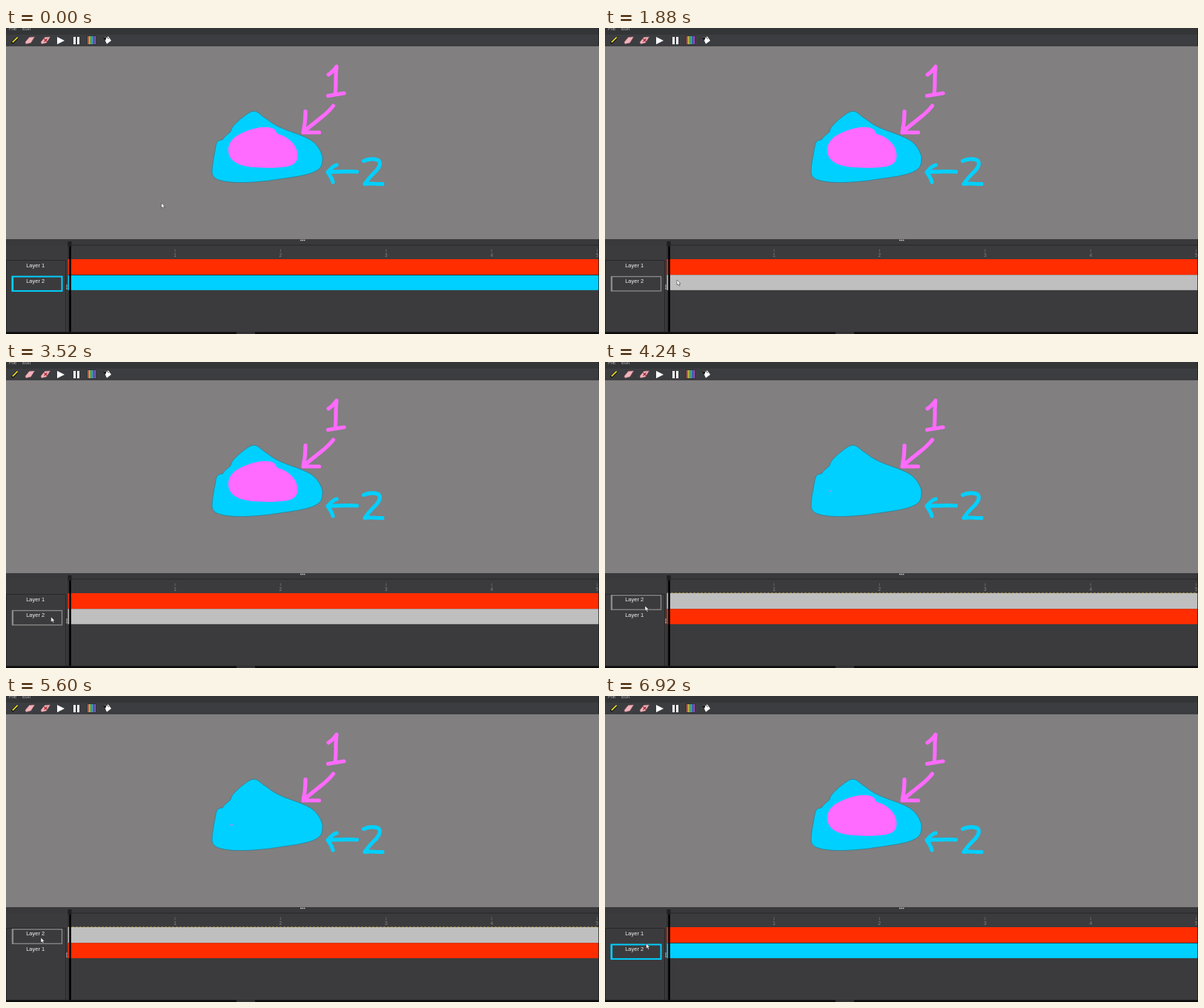
An HTML page for the animation above (6960 ms loop, 800 by 413 pixels).

```html
<!DOCTYPE html>
<html lang="en">
<head>
<meta charset="utf-8">
<title>Layer reordering</title>
<style>
  html, body { margin: 0; width: 100%; height: 100%; overflow: hidden; background: #3b3b3d; }
  svg { display: block; width: 100vw; height: 100vh; }
  text { font-family: "Liberation Sans", Arial, sans-serif; }
  .brush { fill: none; stroke-width: 5.2; stroke-linecap: round; stroke-linejoin: round; }
</style>
</head>
<body>
<svg viewBox="0 0 800 413" preserveAspectRatio="none">
  <rect width="800" height="413" fill="#3b3b3d"/>

  <g id="toolbar">
    <rect width="800" height="9" fill="#343537"/>
    <rect y="9" width="800" height="15" fill="#3c3d40"/>
    <g font-size="6.5" fill="#b4b4b4">
      <text x="4" y="2.6">File</text>
      <text x="22" y="2.6">Edit</text>
    </g>
    <path d="M8 20.5L15.5 13" stroke="#111" stroke-width="3.4"/>
    <path d="M8.8 19.4L15.6 12.6" stroke="#e8dc30" stroke-width="1.8"/>
    <path id="eraser" d="M26 19L31.5 12.5L38.5 12L33.5 20L27 21.5Z" fill="#f3b3bb" stroke="#a66c74" stroke-width=".5"/>
    <use href="#eraser" x="21"/>
    <path d="M51.5 14.5l4 4m0-4l-4 4" stroke="#a02030" stroke-width="1.1"/>
    <path d="M69 12L79 17L69 22Z" fill="#fff"/>
    <path d="M91 12h3v10h-3zM96 12h3v10h-3z" fill="#fff"/>
    <g id="palette"></g>
    <path d="M132 13L138 11.5L142 17L136 21.5Z" fill="#fff"/>
    <path d="M131 13.5L136 12L134 17Z" fill="#151515"/>
    <path d="M136 11.5l2.5 3.5" stroke="#222" stroke-width=".8"/>
  </g>

  <rect y="24" width="800" height="261" fill="#817f80"/>
  <path d="M0 24H800" stroke="#2c2c2e"/>

  <g id="drawing">
    <path fill="#00d0ff" stroke="#32778a" stroke-width=".7" d="M278 194C278 184 281 172 283 160C284 153 287 151 292 151
      C295 146 300 143 303 140C304 133 311 128 316 123C322 119 328 113 333 112.5C340 111 344 119 352 123
      C368 137 389 140 407 149C418 154 425 165 427 174C427 186 425 189 418 193C405 200 380 202 355 206
      C335 208 306 211 287 205C281 203 278 199 278 194Z"/>
    <path id="pinkBlob" fill="#ff6aff" d="M300 167C299 152 311 144 325 139C337 134 353 132 361 136C365 138 364 142 367 143
      C378 146 391 155 393 168C395 179 390 185 379 187C364 190 333 189 321 186C309 183 301 177 300 167Z"/>
    <path id="speck" d="M302 174.5l4-.8" stroke="#9a90f0" stroke-width="1.4"/>
    <g class="brush" stroke="#ff6aff">
      <path d="M435 63C440 60 443 56 446 52C444 64 446 76 444 89M434.5 91.5L456 88"/>
      <path d="M441.5 105C434 115 426 120 420 125C414 130 407 135 401 141M404 112.5C404 122 403 132 401 141L422.5 141"/>
    </g>
    <g class="brush" stroke="#00d0ff">
      <path d="M482.5 179.5C489 176 499 176 503 179C507 184 501 192 495 197C490 202 487 206 484 210.5C492 209 500 211 508 210.5"/>
      <path d="M473.5 194C460 193 447 194 434 194.5M446 185C441 186 437 191 434 194.5C437 199 440 203 441 208"/>
    </g>
  </g>

  <g id="panel">
    <rect y="285" width="800" height="7.5" fill="#39393b"/>
    <path d="M84 293H800" stroke="#262628"/>
    <path d="M0 313.5H80.5V410M0.5 313V410" fill="none" stroke="#272729"/>
    <path d="M84 288V410" stroke="#2d2d2f"/>
    <path d="M397 286.5h1.6m.8 0h1.6m.8 0h1.6" stroke="#d5d5d5" stroke-width="1.4"/>
    <g id="ruler" font-size="6.5" fill="#858587" text-anchor="middle"></g>
    <rect id="topLane" x="83.5" y="312" width="716.5" height="21.3"/>
    <rect id="bottomLane" x="83.5" y="333.3" width="716.5" height="20.5"/>
    <path id="laneDivider" d="M84 333.4H800" stroke="#242426" stroke-width=".8"/>
    <path id="dropLine" d="M84 312H800" stroke="#c9b96a" stroke-width="1" stroke-dasharray="3 2"/>
    <path d="M86.5 288V410" stroke="#000" stroke-width="2.6"/>
    <rect x="83.5" y="288" width="5" height="7" fill="#1f1f21"/>
    <path d="M82 346.5v1.3m0 1v1.3m0 1v1.3" stroke="#ddd" stroke-width="1.3"/>
    <g id="selection" fill="none">
      <rect x="8.5" y="314.8" width="67" height="19.4"/>
      <path d="M9 314.5V334.5" stroke-width="2.2"/>
    </g>
    <g font-size="7.5" fill="#f0f0f0" text-anchor="middle">
      <text id="topLabel" x="39.7" y="323.4"></text>
      <text id="bottomLabel" x="39.7" y="344.4"></text>
    </g>
    <rect y="410.3" width="800" height="2.7" fill="#0c0c0d"/>
    <rect x="311" y="410.3" width="25" height="2.7" fill="#343436"/>
    <path d="M799.6 0V24M799.6 285V413" stroke="#19191a" stroke-width=".8"/>
  </g>

  <path id="cursor" d="M0 0V7L1.7 5.5L2.9 8.2L4.1 7.7L2.9 5.1H5Z" fill="#fff" stroke="#222" stroke-width=".5"/>
</svg>

<script>
const LOOP = 6960;
const GRAB = 600, RELEASE = 6280;
const LANE_EDGE = 333;
const RED = '#ff2d00', CYAN = '#00d0ff', GREY = '#c0bfc0';

// Pointer tip: time, x, y
const pointerPath = [
  [0, 209.5, 236], [80, 208, 238], [460, 99, 341], [640, 98, 341],
  [920, 97, 322], [1180, 97, 321], [1640, 97, 342], [1880, 97, 340],
  [2120, 96, 343], [2680, 93, 328], [2860, 92, 325], [3300, 72, 346],
  [3560, 60, 344], [4080, 54, 328], [4240, 54, 329], [4760, 51, 343],
  [5020, 49, 342], [5500, 47, 325], [5600, 47, 326], [6200, 53, 341],
  [6400, 55, 338], [6760, 55.5, 334], [LOOP, 55.5, 334]
];

const $ = id => document.getElementById(id);
const set = (id, attrs) => {
  for (const name in attrs) $(id).setAttribute(name, attrs[name]);
};
const show = (id, visible) => set(id, { visibility: visible ? 'visible' : 'hidden' });

function buildStatics() {
  const hues = ['#d35a5a', '#e0cf45', '#50c45d', '#42bdcf', '#4965dc', '#a954c9'];
  $('palette').innerHTML = '<rect x="109.5" y="10.5" width="12" height="12" fill="#202428"/>' +
    hues.map((c, i) => `<rect x="${110 + i * 1.9}" y="11" width="1.6" height="11" fill="${c}"/>`).join('');
  $('ruler').innerHTML = [1, 2, 3, 4, 5].map(n => {
    const x = 85.6 + n * 142.4;
    return `<path d="M${x} 298.5v4" stroke="#67676a"/><text x="${x}" y="308.8">${n}</text>`;
  }).join('');
}

function pointerAt(t) {
  const next = Math.max(1, pointerPath.findIndex(p => p[0] > t));
  const [t0, x0, y0] = pointerPath[next - 1];
  const [t1, x1, y1] = pointerPath[next];
  const u = (t - t0) / (t1 - t0);
  const eased = u * u * (3 - 2 * u);
  return [x0 + (x1 - x0) * eased, y0 + (y1 - y0) * eased];
}

function render(t) {
  const [x, y] = pointerAt(t);
  const dragging = t >= GRAB && t < RELEASE;
  const swapped = dragging && y < LANE_EDGE;
  const active = dragging ? GREY : CYAN;

  set('cursor', { transform: `translate(${x.toFixed(2)} ${y.toFixed(2)})` });
  set('topLane', { fill: swapped ? active : RED });
  set('bottomLane', { fill: swapped ? RED : active });
  set('selection', {
    transform: `translate(0 ${swapped ? 0 : 20.7})`,
    stroke: dragging ? '#8b8b8c' : CYAN,
    'stroke-width': dragging ? 1.3 : 2
  });
  $('topLabel').textContent = swapped ? 'Layer 2' : 'Layer 1';
  $('bottomLabel').textContent = swapped ? 'Layer 1' : 'Layer 2';
  show('pinkBlob', !swapped);
  show('speck', swapped);
  show('dropLine', swapped);
  show('laneDivider', !dragging);
}

buildStatics();
render(0);
const start = performance.now();
function tick() {
  render((performance.now() - start) % LOOP);
  requestAnimationFrame(tick);
}
requestAnimationFrame(tick);
</script>
</body>
</html>
```
